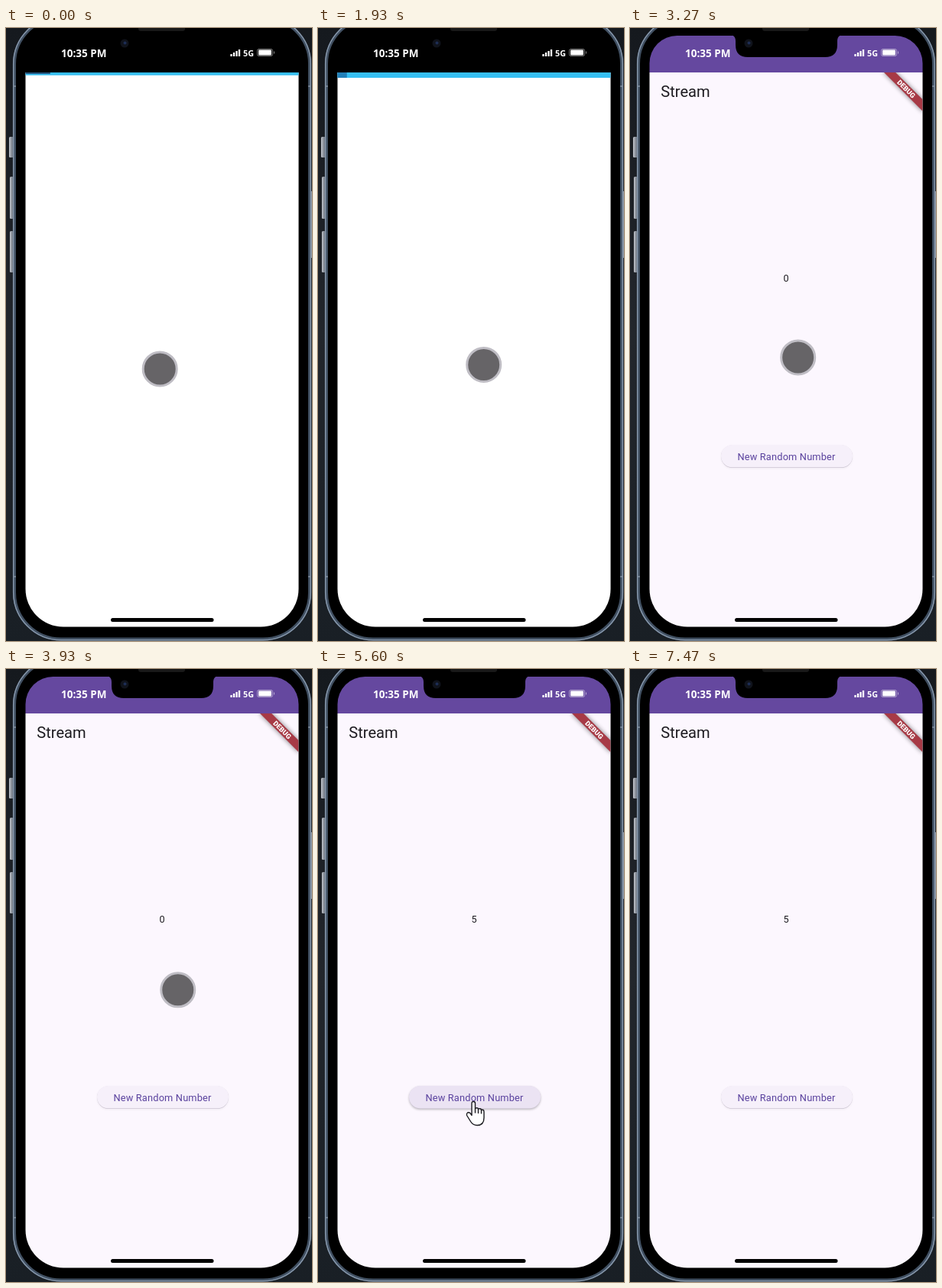
An HTML page that plays this animation: 400 by 800 pixels, repeating every 7540 ms.

```html
<!DOCTYPE html>
<html lang="en">
<head>
<meta charset="utf-8">
<title>Stream</title>
<style>
  html, body { margin: 0; width: 100%; height: 100%; overflow: hidden; background: #171a1f; }
  svg { display: block; width: 400px; height: 800px; }
  text { font-family: Roboto, sans-serif; }
  .status { font-family: "Open Sans", sans-serif; font-weight: 700; fill: #fff; }
</style>
</head>
<body>
<svg viewBox="0 0 400 800">
  <defs>
    <linearGradient id="side">
      <stop offset="0" stop-color="#c3c7ce"/>
      <stop offset=".5" stop-color="#8d939c"/>
      <stop offset="1" stop-color="#5a6370"/>
    </linearGradient>
    <linearGradient id="wall" x2="0" y2="1">
      <stop offset="0" stop-color="#15191e"/>
      <stop offset=".5" stop-color="#22262c"/>
      <stop offset="1" stop-color="#191f25"/>
    </linearGradient>
    <clipPath id="screen">
      <path d="M25.5 46A36 36 0 0 1 61.5 10H346.5A36 36 0 0 1 382.5 46V732A49.5 49.5 0 0 1 333 781.5H75A49.5 49.5 0 0 1 25.5 732Z"/>
    </clipPath>
    <clipPath id="page"><rect x="25.5" y="58" width="357" height="724"/></clipPath>
    <clipPath id="quarter"><rect x="190" y="410" width="25" height="29"/></clipPath>
    <filter id="blur" x="-20%" y="-50%" width="140%" height="200%"><feGaussianBlur stdDeviation="1.5"/></filter>
    <filter id="wideBlur" x="-20%" y="-100%" width="140%" height="300%"><feGaussianBlur stdDeviation="3.5"/></filter>
  </defs>

  <!-- Phone body -->
  <rect width="400" height="800" fill="url(#wall)"/>
  <g fill="url(#side)">
    <rect x="4" y="142" width="6" height="27" rx="1.5"/>
    <rect x="5" y="194" width="5" height="55" rx="1.5"/>
    <rect x="5" y="265" width="5" height="54" rx="1.5"/>
    <rect x="397.5" y="213" width="4" height="87" rx="1"/>
  </g>
  <rect x="11" y="-14" width="386" height="811.5" rx="61" fill="#000" stroke="#415062" stroke-width="4"/>
  <rect x="9.7" y="-15.3" width="388.6" height="814.1" rx="62.3" fill="none" stroke="#8697ab" stroke-width="1.5"/>
  <path d="M9 76h4M395 76h4M9 716h4M395 716h4" stroke="#8291a3" stroke-width="1.5"/>

  <g clip-path="url(#screen)">
    <g id="loading">
      <rect x="25" y="58" width="358" height="724" fill="#fff"/>
      <rect id="track" x="25" y="58" width="358" fill="#36bff3"/>
      <rect id="progress" x="25" y="58"/>
    </g>
    <g id="app">
      <rect x="25" y="10" width="358" height="48" fill="#65489f"/>
      <rect x="25" y="58" width="358" height="724" fill="#fcf7fe"/>
      <text x="40.3" y="90" font-size="20.1" fill="#1d1b20">Stream</text>
      <text id="number" x="204" y="331" font-size="12.6" fill="#1d1b20" text-anchor="middle">0</text>
      <rect id="shadow" x="119" y="545.5" width="172" height="29.5" rx="14.75" fill="#000" filter="url(#blur)"/>
      <rect x="119" y="544.5" width="172" height="29.5" rx="14.75" fill="#cbc4d1"/>
      <rect id="button" x="119" y="544" width="172" height="29.3" rx="14.65"/>
      <text x="204.5" y="563.5" font-size="12.75" letter-spacing=".2" fill="#5a429e" text-anchor="middle">New Random Number</text>
      <g clip-path="url(#page)">
        <g transform="translate(382.5 58) rotate(45) scale(.893)">
          <rect x="-40" y="28" width="80" height="12" opacity=".5" filter="url(#wideBlur)"/>
          <rect x="-50" y="28" width="100" height="12" fill="#a73a46"/>
          <text y="37.6" font-size="10.2" font-weight="900" fill="#fff" text-anchor="middle">DEBUG</text>
        </g>
      </g>
      <path d="M132 9Q138 10 138 17V22Q138 38 154 38H255Q271 38 271 22V17Q271 10 277 9Z" fill="#000"/>
    </g>
    <rect x="137" y="770" width="134.5" height="5" rx="2.5" fill="#000"/>
  </g>

  <!-- Status bar and sensors -->
  <rect x="173" y="-3" width="61" height="7" rx="3" fill="#191919"/>
  <circle cx="155" cy="20" r="5.5" fill="#10131b"/>
  <circle cx="155.5" cy="19.5" r="2" fill="#1d2d54"/>
  <text class="status" x="72" y="38" font-size="13.5">10:35 PM</text>
  <text class="status" x="310" y="37" font-size="10.8">5G</text>
  <path d="M294.5 37v-3M298 37v-5M301.5 37v-7M305 37v-9" stroke="#fff" stroke-width="2.3"/>
  <rect x="328.5" y="27.5" width="20" height="9" rx="2" fill="none" stroke="#fff" stroke-opacity=".45"/>
  <rect x="330" y="28.5" width="17" height="7" rx="1" fill="#fff"/>
  <path d="M350.5 30.5v3" stroke="#fff" stroke-opacity=".5"/>

  <g id="touchClip">
    <circle id="touch" r="22" fill="#666467" stroke="#bfbdc4" stroke-width="3"/>
  </g>
  <g id="hand" stroke="#1b1b20" stroke-width="1.4" stroke-linejoin="round" stroke-linecap="round">
    <path fill="#fff" d="M-2.5 15V1.5Q-2.5-1-.2-1Q2 -1 2 1.5V8.5Q2.4 7.2 4 7.2Q6 7.2 6 9.2Q6.5 8 8 8.2Q10 8.4 10 10.4Q10.5 9.5 12 9.8Q13.5 10.2 13.5 12.5V20Q13.5 30 4.5 30Q-1 30-4 25L-9 17Q-9.5 14.5-8 13.5Q-6.2 12.7-4.5 14.2L-2.5 17Z"/>
    <path fill="none" d="M2 8.5v5M6 9.2v4.8M10 10.4v4"/>
  </g>
</svg>
<script>
const LOOP = 7540, STEP = 200 / 3;
const el = id => document.getElementById(id);
const set = (id, attrs) => {
  for (const name in attrs) el(id).setAttribute(name, attrs[name]);
};
const show = (id, visible) => set(id, { visibility: visible ? 'visible' : 'hidden' });

// Linear interpolation through [time, value] pairs.
function track(t, keys) {
  for (let i = 1; i < keys.length; i++) {
    const [t0, v0] = keys[i - 1], [t1, v1] = keys[i];
    if (t < t1) return v0 + (v1 - v0) * Math.max(0, (t - t0) / (t1 - t0));
  }
  return keys[keys.length - 1][1];
}

const pointerX = [[0, 201], [330, 217], [1730, 217], [2070, 216.5], [3000, 216.5], [3730, 225], [3930, 225], [4530, 203.5]];
const pointerY = [[0, 445], [330, 442.5], [1730, 442.5], [2070, 437.5], [3000, 437.5], [3730, 417], [3930, 417], [4530, 565.5]];
const progressEnd = [[0, 57], [330, 125], [530, 125], [600, 154], [1730, 154], [1731, 25], [2070, 46], [2330, 46], [2530, 71], [2670, 71], [2800, 120]];
const hoverAmount = [[4400, 0], [4600, 1], [5730, 1], [5930, 0]];

function draw(now) {
  const t = Math.floor((now % LOOP + 4) / STEP) * STEP + 4;
  const x = track(t, pointerX), y = track(t, pointerY);
  const appReady = t >= 3000, thickBar = t >= 1730;
  const overButton = t > 3930 && y > 544;

  show('loading', !appReady);
  show('app', appReady);
  set('track', { height: thickBar ? 7 : 3.7 });
  set('progress', {
    width: track(t, progressEnd) - 25,
    height: thickBar ? 7 : 2,
    fill: thickBar ? '#2180b9' : '#245781'
  });

  const hover = track(t, hoverAmount);
  const mix = (a, b) => Math.round(a + (b - a) * hover);
  set('button', { fill: `rgb(${mix(246, 235)},${mix(240, 227)},${mix(250, 243)})` });
  set('shadow', { opacity: .05 + .2 * hover });
  el('number').textContent = t < 5130 ? '0' : '5';

  show('touch', !overButton);
  set('touch', { cx: x, cy: y });
  set('touchClip', { 'clip-path': t >= 2500 && t < 2670 ? 'url(#quarter)' : 'none' });
  show('hand', overButton && t < 5730);
  set('hand', { transform: `translate(${x} ${y})` });
}

function frame() {
  draw(performance.now());
  requestAnimationFrame(frame);
}
frame();
</script>
</body>
</html>
```
